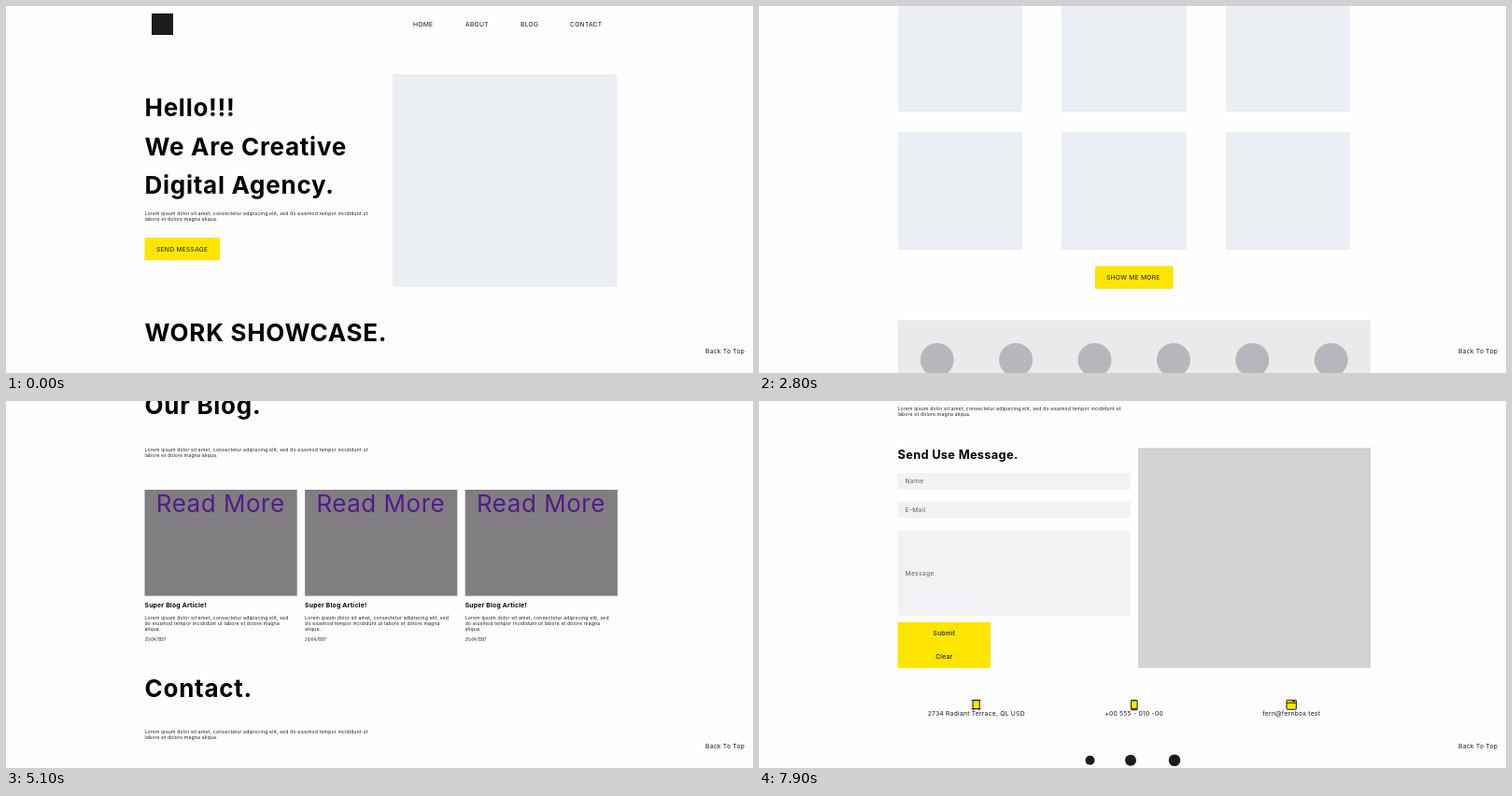
An HTML page that plays this animation: 800 px wide and 393 px high, repeating every 8000 ms.

```html
<!DOCTYPE html>
<html lang="en">
<head>
<meta charset="utf-8">
<title>Agency page scroll</title>
<style>
  html, body { margin: 0; width: 100%; height: 100%; overflow: hidden; background: #fefdff; }
  svg { display: block; }
  text { font: 400 6.75px Inter, Roboto, sans-serif; letter-spacing: .035em; fill: #1c1c1e; }
  .h1 { font-size: 26px; font-weight: 700; letter-spacing: .028em; fill: #000; }
  .h2 { font-size: 12.8px; font-weight: 700; letter-spacing: .025em; fill: #000; }
  .h3 { font-weight: 700; fill: #000; }
  .small { font-size: 5.06px; letter-spacing: .04em; }
  .date { font-size: 4.2px; letter-spacing: 0; }
  .more { font-size: 26px; letter-spacing: .02em; fill: #551a8b; }
  .hint { font-weight: 500; fill: #757575; }
  .mid { text-anchor: middle; }
  .key { text-anchor: middle; font-weight: 500; }
</style>
</head>
<body>
<svg width="800" height="393" viewBox="0 0 800 393">
  <g id="page"></g>
  <text x="749" y="372.4">Back To Top</text>
</svg>
<script>
const YELLOW = '#fde500', PALE = '#ebeff3', GREY = '#d2d1d3', FIELD = '#f2f1f3', INK = '#1c1c1e';
const LEFT = 148.5;
const LOREM = ['Lorem ipsum dolor sit amet, consectetur adipiscing elit, sed do eiusmod tempor incididunt ut',
  'labore et dolore magna aliqua.'];
const TEASER = ['Lorem ipsum dolor sit amet, consectetur adipiscing elit, sed',
  'do eiusmod tempor incididunt ut labore et dolore magna', 'aliqua.'];

let markup = '';
const rect = (x, y, w, h, fill, extra = '') =>
  markup += `<rect x="${x}" y="${y}" width="${w}" height="${h}" fill="${fill}" ${extra}/>`;
const dot = (x, y, r, fill) => markup += `<circle cx="${x}" cy="${y}" r="${r}" fill="${fill}"/>`;
const text = (x, y, str, cls = '') => markup += `<text x="${x}" y="${y}" class="${cls}">${str}</text>`;
const lines = (x, y, list) => list.forEach((str, i) => text(x, y + 6 * i, str, 'small'));
const outline = `stroke="${INK}" stroke-width="1"`;

// Header and hero
rect(156, 8, 23, 23, INK);
[[436, 'HOME'], [492, 'ABOUT'], [551, 'BLOG'], [604, 'CONTACT']].forEach(([x, s]) => text(x, 21.6, s));
['Hello!!!', 'We Are Creative', 'Digital Agency.'].forEach((s, i) => text(LEFT, 118 + 41.7 * i, s, 'h1'));
lines(LEFT, 224, LOREM);
rect(LEFT, 248, 80.5, 24.3, YELLOW);
text(161, 262.5, 'SEND MESSAGE');
rect(414, 73, 240.5, 227.7, PALE);

// Work showcase
text(LEFT, 358.7, 'WORK SHOWCASE.', 'h1');
[[152.5, 'ALL'], [180, 'BRANDING'], [233, 'ILLUSTRATION'], [298, 'WEB'], [582, 'NEWEST FIST']]
  .forEach(([x, s]) => text(x, 400, s));
markup += `<path d="M636.5 397.1l1.8 1.8 1.8-1.8" fill="none" ${outline}/>`;
for (let i = 0; i < 9; i++) rect(LEFT + 175.6 * (i % 3), 432 + 147.7 * Math.floor(i / 3), 133.5, 126.4, PALE);
rect(360, 871, 83.5, 24.4, YELLOW);
text(372, 885.5, 'SHOW ME MORE');
rect(LEFT, 929, 506.5, 84.5, '#ebeaeb');
for (let i = 0; i < 6; i++) dot(190.7 + 84.4 * i, 971.5, 18, '#b7b6bc');

// Team
text(LEFT, 1071.3, 'About Us.', 'h1');
lines(LEFT, 1110.2, LOREM);
const columns = [0, 1, 2].map(i => LEFT + 171.6 * i);
columns.forEach(x => {
  rect(x, 1151.5, 163.2, 218.5, GREY);
  text(x, 1157.3, '#ProfilePhoto');
  rect(x, 1349.5, 114, 20.5, YELLOW);
  text(x + 2, 1357, 'Ela Söner');
  text(x + 2, 1367.2, 'Front End Developer');
});

// Blog
text(LEFT, 1427.7, 'Our Blog.', 'h1');
lines(LEFT, 1467.3, LOREM);
columns.forEach(x => {
  rect(x, 1508.5, 163.2, 113.7, '#807e80');
  text(x + 12.3, 1532.5, 'Read More', 'more');
  text(x, 1634.5, 'Super Blog Article!', 'h3');
  lines(x, 1647.2, TEASER);
  text(x, 1670.2, '20/04/1997', 'date');
});

// Contact
text(LEFT, 1730.5, 'Contact.', 'h1');
lines(LEFT, 1769.8, LOREM);
text(LEFT, 1822, 'Send Use Message.', 'h2');
[[1837.5, 17.5, 'Name'], [1868, 17.5, 'E-Mail'], [1899, 91, 'Message']].forEach(([y, h, s]) => {
  rect(LEFT, y, 249, h, FIELD);
  text(156.5, y + h / 2 + 2.3, s, 'hint');
});
rect(LEFT, 1997, 99.5, 49, YELLOW);
text(198.3, 2011.3, 'Submit', 'key');
text(198.3, 2036, 'Clear', 'key');
rect(406, 1810.5, 249, 235.5, GREY);

rect(229, 2080.8, 7.2, 9, YELLOW, outline);
markup += `<path d="M227.6 2080.5h10M227.6 2089.8h10M230 2090l-1 1.6M235.2 2090l1 1.6" ${outline}/>`;
rect(398.5, 2080.5, 6.6, 10.6, YELLOW, outline + ' rx="1"');
markup += `<path d="M398.5 2081h6.6M398.5 2089.8h6.6" ${outline}/>`;
rect(565, 2080.5, 10.4, 10, YELLOW, outline + ' rx=".8"');
markup += `<path d="M565 2083.4h10.4M571 2081.7h3" ${outline}/>`;
text(232.7, 2097.3, '2734 Radiant Terrace, QL USD', 'mid');
text(401.6, 2097.3, '+00 555 - 010 -00', 'mid');
text(570.2, 2097.3, 'fern@fernbox.test', 'mid');
[[354.5, 5], [398, 6], [445, 6.3]].forEach(([x, r]) => dot(x, 2145, r, INK));

const page = document.getElementById('page');
page.innerHTML = markup;

// Scroll keys: time in ms, offset in px, speed in px per 100 ms
const KEYS = [[900, 0, 18], [2000, 324, 33.5], [3500, 833, 35], [4100, 1051.4, 36.4], [5100, 1413.5, 36],
  [6500, 1753, 12.6], [7200, 1800, 0], [7500, 1800, 0], [7900, 1760.2, -19]];

function scrollAt(t) {
  if (t <= KEYS[0][0]) return 0;
  const i = KEYS.findIndex(k => t <= k[0]);
  const [t0, y0, v0] = KEYS[i - 1], [t1, y1, v1] = KEYS[i];
  const u = (t - t0) / (t1 - t0), w = 1 - u, span = (t1 - t0) / 100;
  return y0 * w * w * (1 + 2 * u) + y1 * u * u * (3 - 2 * u) + span * u * w * (v0 * w - v1 * u);
}

function draw() {
  const t = Math.floor(performance.now() % 8000 / 100) * 100;
  page.setAttribute('transform', `translate(0 ${-scrollAt(t)})`);
  requestAnimationFrame(draw);
}
draw();
</script>
</body>
</html>
```
